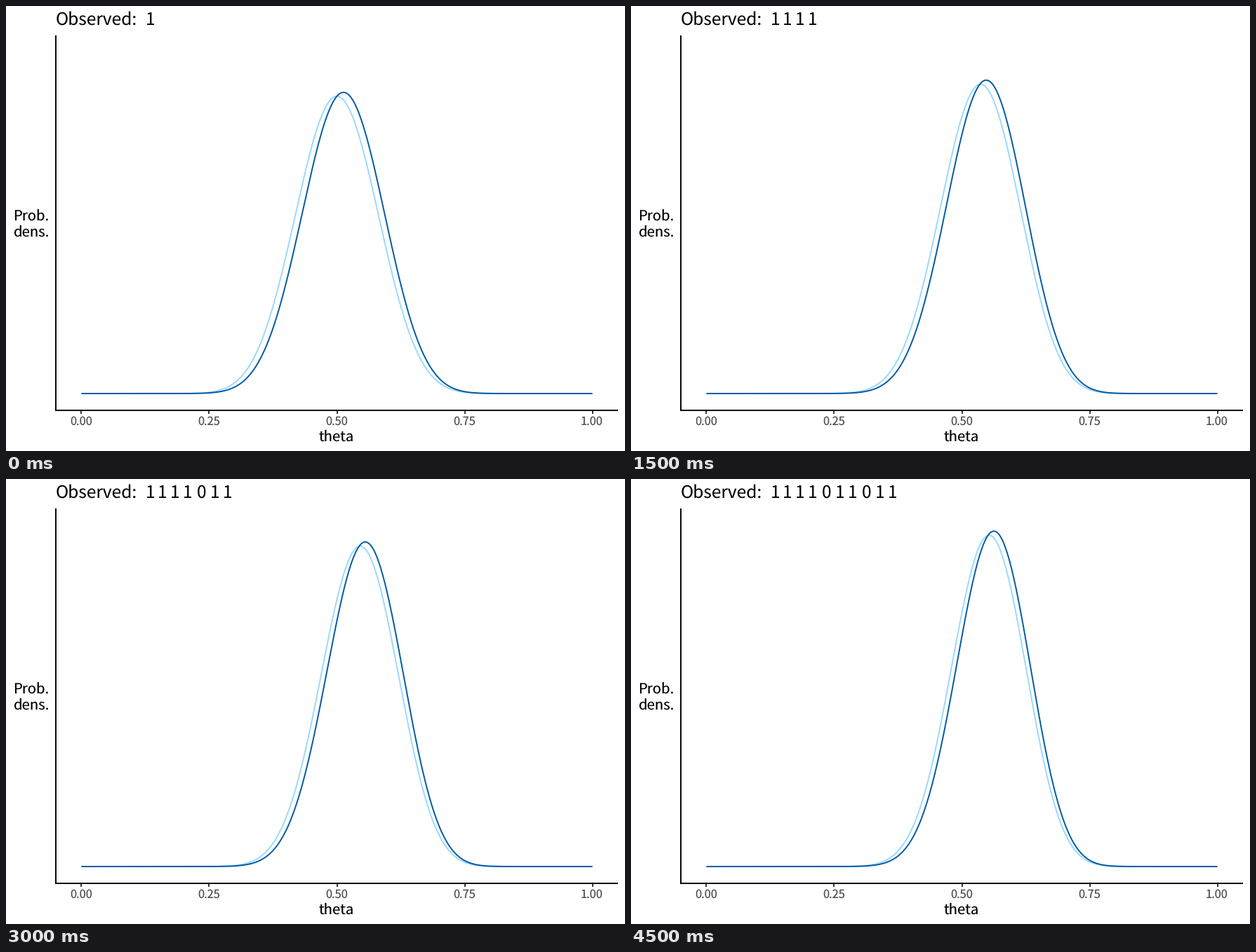
These frames come from a looping animation (882x635 px, 5000 ms). A matplotlib script:

```python
import math

import numpy as np
import matplotlib.pyplot as plt
from matplotlib.animation import FuncAnimation

W, H, DPI = 882, 635, 128
PX = 72 / DPI  # one pixel in points

LEFT, RIGHT, TOP, BOTTOM = 71, 872, 42, 577
X0, X_SPAN = 107.4, 728.2
Y0, Y_SCALE = 553, 84.6

LIGHT, DARK = "#99d9ff", "#0059a3"
STROKE = 1.94 * PX

FLIPS = [1, 1, 1, 1, 0, 1, 1, 0, 1, 1]
PRIOR = 20  # prior is Beta(20, 20)
HALF_STEP = {1: 8.9, 0: 10.7}

plt.rcParams["font.family"] = "Noto Sans CJK JP"
plt.rcParams["text.hinting"] = "none"

fig = plt.figure(figsize=(W / DPI, H / DPI), dpi=DPI, facecolor="white")
ax = fig.add_axes([0, 0, 1, 1])
ax.set_xlim(0, W)
ax.set_ylim(H, 0)
ax.axis("off")


def line(xs, ys, color):
    return ax.plot(xs, ys, color=color, lw=STROKE, solid_capstyle="butt")[0]


def label(x, y, text, size, color="black", ha="left"):
    return ax.text(x, y, text, fontsize=size * PX, color=color,
                   ha=ha, va="baseline")


def beta_pdf(x, a, b):
    log_c = math.lgamma(a + b) - math.lgamma(a) - math.lgamma(b)
    return math.exp(log_c) * x ** (a - 1) * (1 - x) ** (b - 1)


def density_y(count):
    ones = sum(FLIPS[:count])
    pdf = beta_pdf(theta, PRIOR + ones, PRIOR + count - ones)
    return Y0 - Y_SCALE * pdf


theta = np.linspace(0, 1, 501)
curve_x = X0 + X_SPAN * theta
before = line(curve_x, density_y(0), LIGHT)
after = line(curve_x, density_y(1), DARK)

for value in np.linspace(0, 1, 5):
    x = X0 + X_SPAN * value
    line([x, x], [BOTTOM, BOTTOM + 5], "#333333")
    label(x - 0.5, 598, f"{value:.2f}", 16.4, "#4d4d4d", "center")
line([LEFT, LEFT], [TOP, BOTTOM + 1], "black")
line([LEFT - 1, RIGHT], [BOTTOM, BOTTOM], "black")

label(LEFT, 27, "Observed:", 24.5)
label(471, 621, "theta", 20.3, ha="center")
label(10, 306, "Prob.", 20.3)
label(10, 329, "dens.", 20.3)

digits = []
pen = 198.5
for i, flip in enumerate(FLIPS):
    if i:
        pen += HALF_STEP[FLIPS[i - 1]] + HALF_STEP[flip]
    digits.append(label(pen, 27, str(flip), 24.5))


def update(i):
    before.set_ydata(density_y(i))
    after.set_ydata(density_y(i + 1))
    for k, digit in enumerate(digits):
        digit.set_visible(k <= i)
    return [before, after, *digits]


anim = FuncAnimation(fig, update, frames=len(FLIPS), interval=500,
                     init_func=lambda: update(0), repeat=True,
                     repeat_delay=0, blit=False)
plt.show()
```
